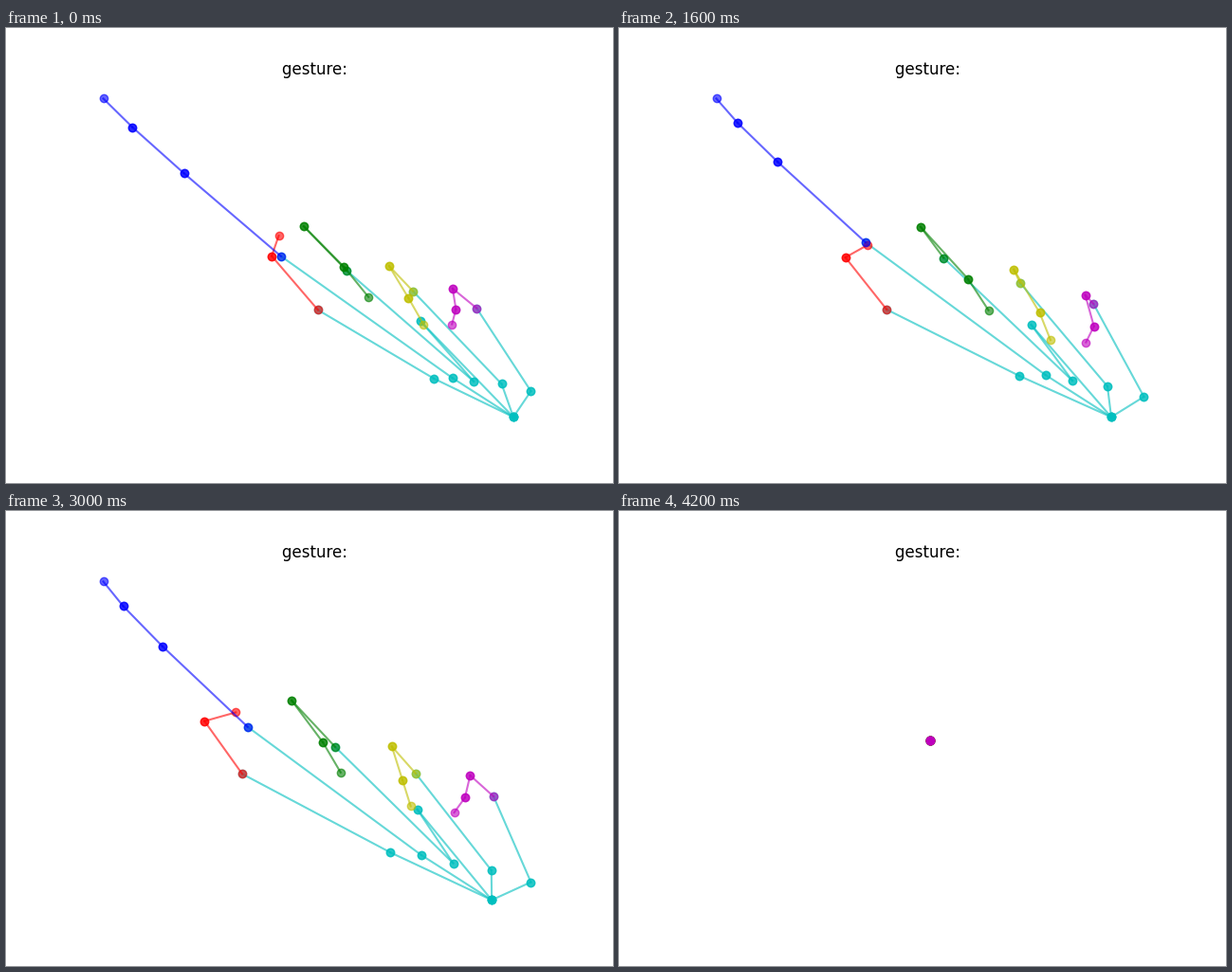
Animation of 640 by 480 pixels, one loop 9000 ms. Source, as a matplotlib script:

```python
import numpy as np
import matplotlib.pyplot as plt
from matplotlib.animation import FuncAnimation

FRAMES, STEP = 90, 100
HAND_END = 42                    # from here on every joint sits at the centre
LEFT, RIGHT, TOP, BOTTOM = 102.55, 553.45, 74.4, 410.4

# How far the hand is swung, curled and flexed at a few moments.
TIMES = np.array([0, 10, 16, 24, 30, 34, 41])
DIALS = np.array([
    [0.08, 0, 1], [0.84, 1, 0], [0.5, 0.3, -0.3], [0, 0, 0],
    [0.68, -0.08, 0], [1, 0, 0], [0.8, 0, 0],
])
SLOPES = np.gradient(DIALS, TIMES, axis=0)

# Joints of the resting hand, each finger from palm to tip.
REST = [
    [(455, 373), (331, 308), (279, 253), (281, 232)],
    [(475, 370), (281, 230), (179, 144), (130, 101), (LEFT, TOP)],
    [(496, 373), (345, 241), (312, 207), (369, 263), (399, 298)],
    [(524, 375), (413, 262), (400, 248), (435, 295), (455, 326)],
    [(RIGHT, 382), (478, 279), (465, 271), (483, 306), (483, 325)],
]
COLORS = 'rbgym'


def along(direction, weights):
    """Shift every joint along one direction, by its weight."""
    return np.outer(weights, direction)


def moves(f):
    """Full swing, curl and flex of the joints of finger f."""
    if f == 0:
        swing = np.array([(0, 0), (-116, -42), (-98, -43), (-53, -26)])
        curl = along((38, 26), [0.3, 1, 1, 0.9])
        flex = along((9, -9), [0.2, 0.8, 1, 1.2])
    elif f == 1:
        swing = along((-38, -3), [0, 1, 0.53, 0.24, 0])
        curl = along((5, 3), [1, 1, 1, 0.5, 0])
        flex = along((12, 11), [0, 1, 0.85, 0.33, 0])
    else:
        swing = np.array([(0, 0), (28, 22), (14, 3), (-19, -13), (-36, -18)])
        swing = swing + (f - 3) * np.array([25, 10.5])
        curl = along((84 - 11 * f, 50 - 6.5 * f), [0, 0, 0.66, 1, 0.94])
        flex = along((14, 14), [0, 1, 0.2, -0.65, -0.85])
    swing[0] = 18 * f - 72, 8 * f - 18
    return np.stack([swing, curl, flex])


still = np.zeros((2, 2))
wrist_palm = np.stack([[(-38, 0), (-5, 10)], still, still])
rest = np.concatenate([[(538, BOTTOM), (437, 308)]] + REST)
motion = np.concatenate([wrist_palm] + [moves(f) for f in range(5)], axis=1)

# Palm bones are drawn first, then each finger.
bones, finger_bones, base = [], [], 2
for finger, color in zip(REST, COLORS):
    end = base + len(finger)
    bones += [(1 if color == 'g' else 0, base, 'c'), (base, base + 1, 'c')]
    finger_bones += [(j, j + 1, color) for j in range(base + 1, end - 1)]
    base = end
bones = [(0, 1, 'c')] + bones + finger_bones


def dials(frame):
    """Cubic Hermite curve through the dial settings."""
    k = min(np.searchsorted(TIMES, frame, side='right') - 1, len(TIMES) - 2)
    span = TIMES[k + 1] - TIMES[k]
    u = (frame - TIMES[k]) / span
    ease = u * u * (3 - 2 * u)
    return (DIALS[k] * (1 - ease) + DIALS[k + 1] * ease
            + span * u * (1 - u) * ((1 - u) * SLOPES[k] - u * SLOPES[k + 1]))


def pose(frame):
    if frame >= HAND_END:
        return np.full(rest.shape, [(LEFT + RIGHT) / 2, (TOP + BOTTOM) / 2])
    return rest + np.tensordot(dials(frame), motion, axes=1)


fig, ax = plt.subplots(figsize=(6.4, 4.8), dpi=100)
ax.set_title('gesture: ')
ax.axis('off')
ax.set_xlim(80, 576)
ax.set_ylim(427.2, 57.6)
lines = [ax.plot([], [], color + 'o-', alpha=0.6)[0] for _, _, color in bones]


def draw(frame):
    points = pose(frame)
    for line, (a, b, _) in zip(lines, bones):
        line.set_data(points[[a, b], 0], points[[a, b], 1])
    return lines


anim = FuncAnimation(fig, draw, frames=FRAMES, interval=STEP, repeat=True,
                     repeat_delay=0, init_func=lambda: draw(0))
plt.show()
```
